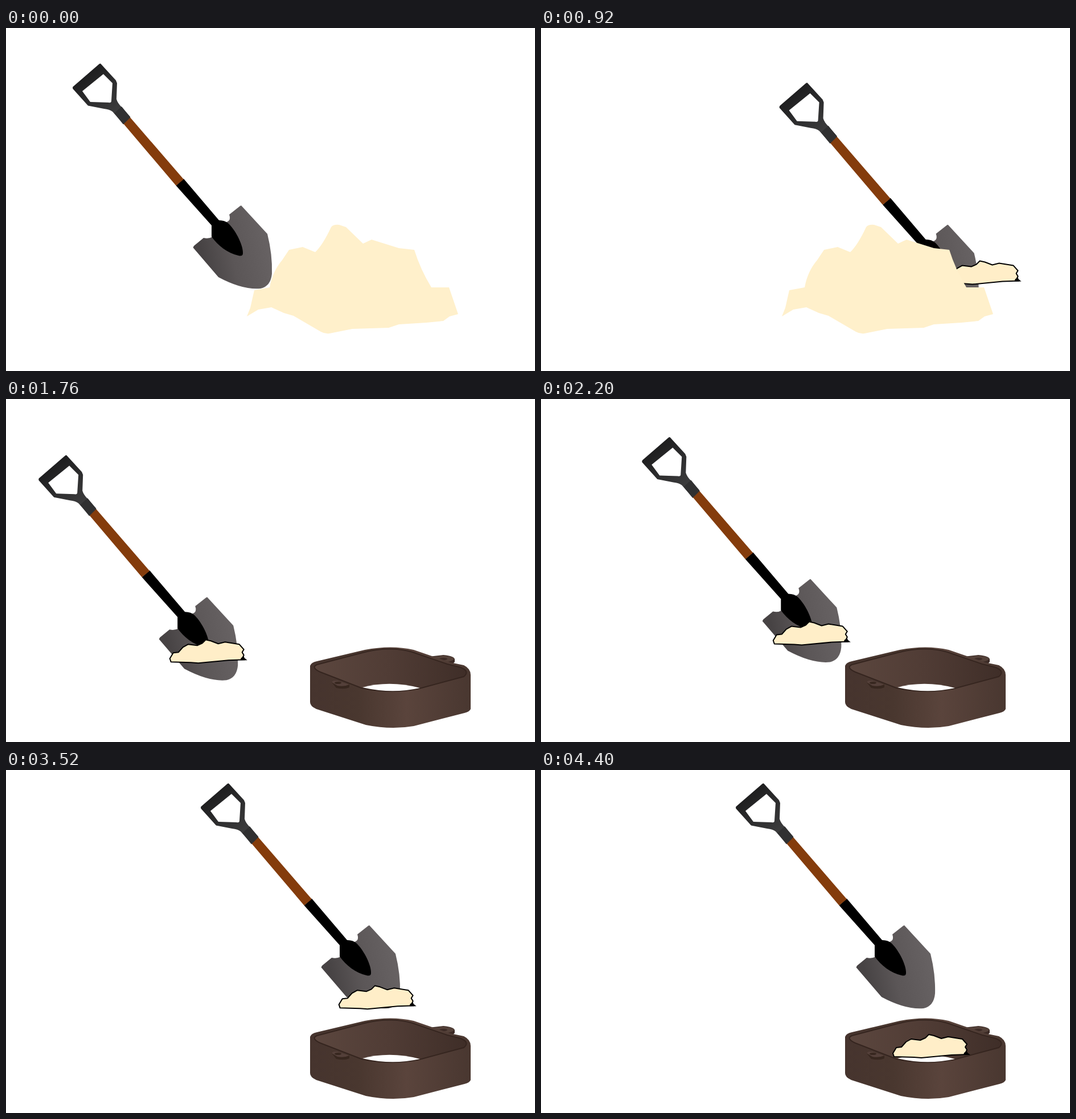
An HTML page without scripts for the animation above (4.48 s loop, 929 by 603 pixels).

```html
<!DOCTYPE html>
<html lang="en">
<head>
<meta charset="utf-8">
<title>Shovel and sand</title>
<style>
  html, body { margin: 0; width: 100%; height: 100%; overflow: hidden; background: #fff; }
  svg { display: block; width: 929px; height: 603px; }
</style>
</head>
<body>
<svg viewBox="0 0 929 603">
  <defs>
    <linearGradient id="steel" gradientUnits="userSpaceOnUse" x1="345" y1="400" x2="455" y2="375">
      <stop offset="0" stop-color="#474344"/>
      <stop offset=".45" stop-color="#5b5657"/>
      <stop offset="1" stop-color="#666162"/>
    </linearGradient>
    <linearGradient id="grip" gradientUnits="userSpaceOnUse" x1="142" y1="84" x2="200" y2="152">
      <stop offset="0" stop-color="#1f1f20"/>
      <stop offset=".3" stop-color="#29292a"/>
      <stop offset="1" stop-color="#3e3e3f"/>
    </linearGradient>
    <linearGradient id="inner" x1="0" x2="1">
      <stop offset="0" stop-color="#5b463e"/>
      <stop offset=".5" stop-color="#503c35"/>
      <stop offset="1" stop-color="#3f2e28"/>
    </linearGradient>
    <linearGradient id="outer" x1="0" x2="1">
      <stop offset="0" stop-color="#46342e"/>
      <stop offset=".3" stop-color="#49372f"/>
      <stop offset=".6" stop-color="#5a443c"/>
      <stop offset="1" stop-color="#493730"/>
    </linearGradient>

    <g id="shovel">
      <path fill="url(#steel)" d="M413 312L459 362Q468 398 467 432Q465 454 447 458Q416 461 373 438L328.500 386L330 383L347 369Q356 371 363 367L380 342Q397 342 392 328L411 313Z"/>
      <path d="M312 265L374 338Q385 338 391 344C405 358 417 384 416 396Q416 402 408 400C389 396 372 382 361 367L361 347L298.500 277Z"/>
      <path fill="#843c0c" d="M203.500 165L217 156L312 266L298.500 277Z"/>
      <path fill="url(#grip)" fill-rule="evenodd" d="M166 62.500L193 92L195 97L194 125Q196 132 203 139L218 156L206 168L187 147Q182 143 172 142L144 136.500L117.500 107Q116 104 119 102L164 63ZM171 81L187 97L185 128Q185 132 180 131L148 130L134 111Z"/>
      <path fill="#303031" d="M190 150L203 138L218.500 157L206 169.500Z"/>
    </g>

    <g id="scoop">
      <path fill="#ffeec8" stroke="#000" stroke-width="2" stroke-linejoin="round" d="M758 438L756 432L762 422L771 421L779 412L788 407L804 409L813 405L819 399L828 401L841 406L853 403L878 407L886 416L883 421L886 426L884 430L888 434L859 435L806 440L793 439Z"/>
      <path d="M881 431L886 428L887 431L892 435L880 435Z"/>
    </g>

    <path id="pile" fill="#fff0cb" d="M423 507L429 492L436 461L463 456Q468 428 485 408L497 390L521 385L543 394Q556 382 571 350Q575 345 585 346L597 350L627 379L642 372L690 387L717 390Q728 425 747 456L778 456L794 503L779 507L768 515L738 518L690 521L672 527L608 529L568 537Q560 538 553 534L505 506L488 501L466 491L443 495Z"/>

    <g id="mould">
      <path fill="#3b2a25" d="M742 453L768 450Q788 452 788 458V462Q786 466 776 467Z"/>
      <path fill="#544139" d="M746 454L768 451Q786 453 787 457Q784 462 770 462Z"/>
      <ellipse cx="768" cy="457" rx="7" ry="2" fill="#3b2a25"/>
      <path fill="url(#outer)" d="M534 469Q536 463 546 461L630 441Q677 432 716 441L780 463L804 468Q816 474 816 485V545Q814 550 805 552L716 575Q676 582 632 573L545 545Q534 540 534 533Z"/>
      <path fill="url(#inner)" stroke="#35251f" stroke-width="2" d="M546 467L630 445Q676 434 714 445L775 466L799 472Q815 479 804 488L726 509Q675 519 624 508L552 480Q535 472 546 467Z"/>
      <path fill="#fff" d="M626 507Q674 494 727 508Q677 519 626 507Z"/>
      <path fill="#37271f" d="M572 498Q573 494 582 495L603 502V507Q594 511 580 508Z"/>
      <path fill="#54403a" d="M572 498Q573 494 582 495L603 502Q594 506 582 504Z"/>
      <ellipse cx="583" cy="499" rx="6" ry="2" fill="#37271f"/>
    </g>
  </defs>

  <!-- Digging into the pile -->
  <g>
    <animate attributeName="visibility" values="visible;hidden" keyTimes="0;.3304" calcMode="discrete" dur="4.48s" repeatCount="indefinite"/>
    <g>
      <animateMotion path="M0 0Q190 96 394 0" dur="4.48s" repeatCount="indefinite" calcMode="spline"
        keyPoints="0;0;.5;1;1" keyTimes="0;.0161;.1612;.3063;1"
        keySplines="0 0 1 1;.333 0 .667 .333;.333 .667 .667 1;0 0 1 1"/>
      <use href="#shovel"/>
    </g>
    <g>
      <animateMotion path="M-220 47L6 -1" dur="4.48s" repeatCount="indefinite" calcMode="spline"
        keyPoints="0;0;.5;1;1" keyTimes="0;.0161;.1612;.3063;1"
        keySplines="0 0 1 1;.333 0 .667 .333;.333 .667 .667 1;0 0 1 1"/>
      <use href="#scoop"/>
    </g>
    <use href="#pile"/>
  </g>

  <!-- Filling the mould -->
  <g visibility="hidden">
    <animate attributeName="visibility" values="hidden;visible" keyTimes="0;.3304" calcMode="discrete" dur="4.48s" repeatCount="indefinite"/>
    <use href="#mould"/>
    <g>
      <animateMotion path="M-70 39L225 -39" dur="4.48s" repeatCount="indefinite" calcMode="spline"
        keyPoints="0;0;.5;1;1" keyTimes="0;.3549;.5;.6451;1"
        keySplines="0 0 1 1;.333 0 .667 .333;.333 .667 .667 1;0 0 1 1"/>
      <use href="#shovel"/>
      <g>
        <animateMotion path="M0 0L45.5 117" dur="4.48s" repeatCount="indefinite" calcMode="spline"
          keyPoints="0;0;.5;1;1" keyTimes="0;.6797;.8248;.9699;1"
          keySplines="0 0 1 1;.333 0 .667 .333;.333 .667 .667 1;0 0 1 1"/>
        <use href="#scoop" x="-408.5" y="-12"/>
      </g>
    </g>
  </g>
</svg>
</body>
</html>
```
